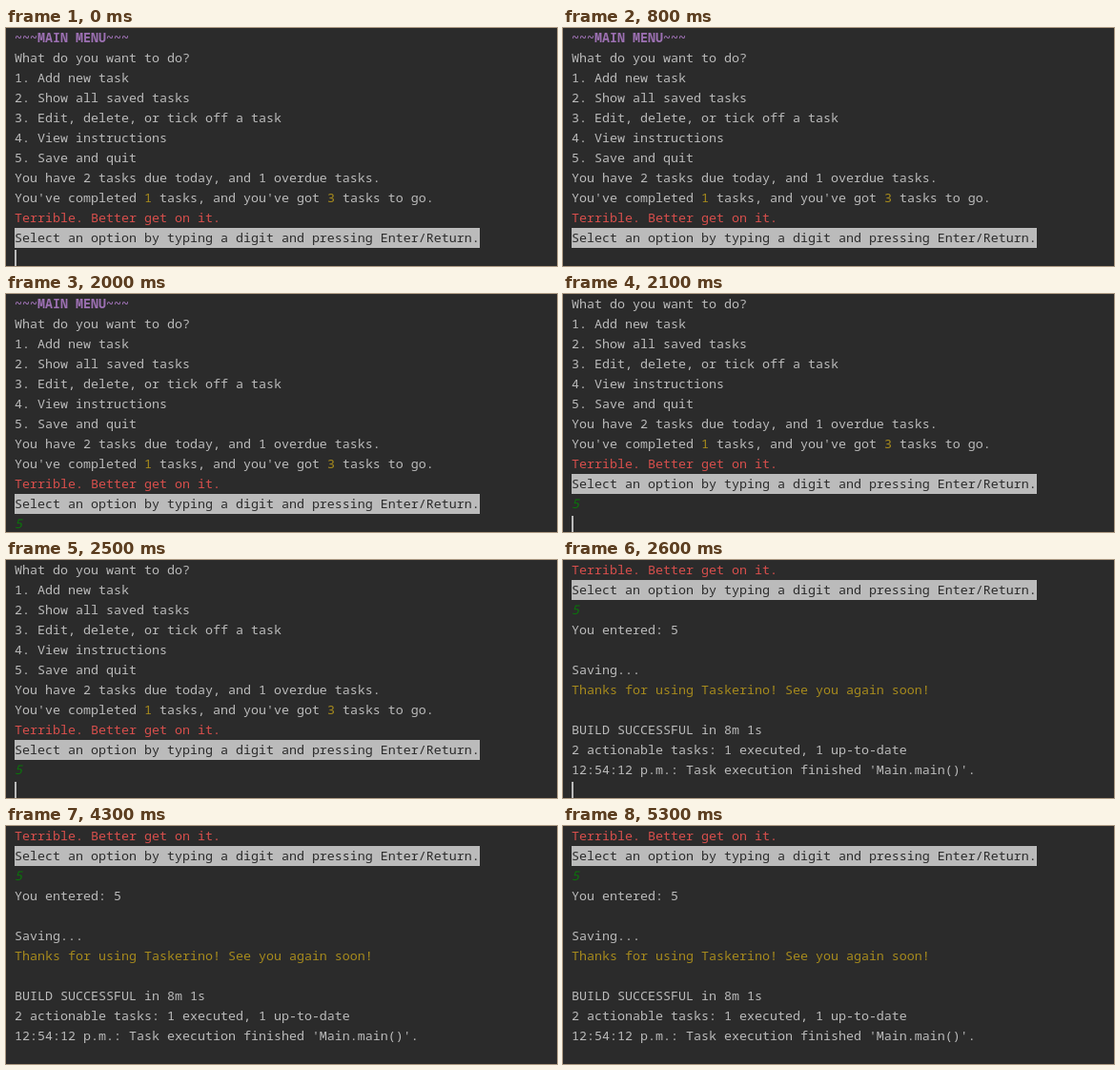
Write an HTML page that moves like this. It is 578 px wide and 250 px high and loops after 5500 ms.

```html
<!DOCTYPE html>
<html lang="en">
<head>
<meta charset="utf-8">
<title>Task console</title>
<style>
  html, body { margin: 0; width: 100%; height: 100%; overflow: hidden; background: #2b2b2b; }
  #log {
    position: absolute; left: 9px; top: 0; margin: 0;
    font: 13.333px/21px "Noto Sans Mono", "DejaVu Sans Mono", monospace;
    font-variant-ligatures: none; color: #bbb;
  }
  #log div { height: 21px; white-space: pre; }
  .title { color: #9c70b2; font-weight: bold; }
  .red { color: #d84f4c; }
  .gold { color: #a68a1d; }
  .prompt { width: 488px; background: #bbb; color: #2b2b2b; }
  .input { color: #0b740b; font-style: italic; }
  #caret { position: absolute; top: 233px; width: 2px; height: 17px; background: #bbb; }
</style>
</head>
<body>
<div id="log"></div>
<div id="caret"></div>
<script>
const LOOP = 5500, ROW = 21;
const gold = s => `<span class="gold">${s}</span>`;

// [text, class]
const lines = [
  ["~~~MAIN MENU~~~", "title"],
  ["What do you want to do?"],
  ["1. Add new task"],
  ["2. Show all saved tasks"],
  ["3. Edit, delete, or tick off a task"],
  ["4. View instructions"],
  ["5. Save and quit"],
  ["You have 2 tasks due today, and 1 overdue tasks."],
  [`You've completed ${gold(1)} tasks, and you've got ${gold(3)} tasks to go.`],
  ["Terrible. Better get on it.", "red"],
  ["Select an option by typing a digit and pressing Enter/Return.", "prompt"],
  ["5", "input"],
  ["You entered: 5"],
  [""],
  ["Saving..."],
  ["Thanks for using Taskerino! See you again soon!", "gold"],
  [""],
  ["BUILD SUCCESSFUL in 8m 1s"],
  ["2 actionable tasks: 1 executed, 1 up-to-date"],
  ["12:54:12 p.m.: Task execution finished 'Main.main()'."]
];

// Console states: start time, lines printed, lines scrolled away, caret x
const states = [
  { at: 0, count: 11, scroll: 0, x: 9 },
  { at: 1200, count: 12, scroll: 0, x: 16 },
  { at: 2100, count: 12, scroll: 1, x: 9 },
  { at: 2600, count: 20, scroll: 9, x: 9 }
];

// The caret starts lit and toggles at each of these times
const blinks = [400, 900, 1900, 2100, 3200, 3700, 4200, 4700, 5300];

const log = document.getElementById("log");
const caret = document.getElementById("caret");
log.innerHTML = lines.map(([text, cls = ""]) => `<div class="${cls}">${text}</div>`).join("");
const rows = [...log.children];

function draw(now) {
  const t = now % LOOP;
  const state = states.filter(s => s.at <= t).pop();
  rows.forEach((row, i) => row.hidden = i >= state.count);
  log.style.top = -state.scroll * ROW + "px";
  caret.style.left = state.x + "px";
  caret.hidden = blinks.filter(b => b <= t).length % 2 === 1;
}

const start = performance.now();
function tick() {
  draw(performance.now() - start);
  requestAnimationFrame(tick);
}
tick();
</script>
</body>
</html>
```
